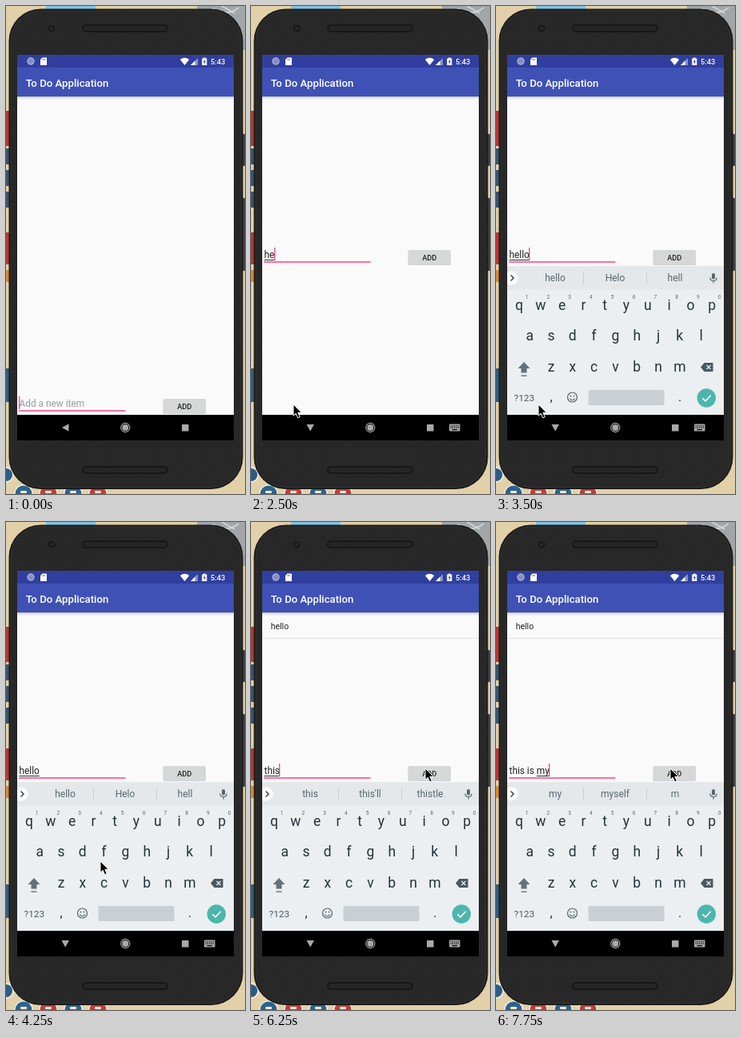
Animation of 299 by 610 pixels, one loop 8000 ms. Source, as an HTML page with a canvas:

```html
<!DOCTYPE html>
<html lang="en">
<head>
<meta charset="utf-8">
<title>To Do Application</title>
<style>
html, body { margin: 0; width: 100%; height: 100%; overflow: hidden; background: #e1d0a8; }
canvas { display: block; }
</style>
</head>
<body>
<canvas id="stage" width="299" height="610"></canvas>
<script>
const ctx = document.getElementById('stage').getContext('2d');
const LOOP = 8000, TICK = 250;
const PINK = '#ff4081', INK = '#263238', NAV = '#a9a9a9';

function rect(x, y, w, h, fill, radius = 0) {
  ctx.fillStyle = fill;
  ctx.beginPath();
  ctx.roundRect(x, y, w, h, radius);
  ctx.fill();
}
function circle(x, y, r, fill) {
  ctx.fillStyle = fill;
  ctx.beginPath();
  ctx.arc(x, y, r, 0, Math.PI * 2);
  ctx.fill();
}
function shape(d, fill, stroke, width = 1, x = 0, y = 0) {
  ctx.save();
  ctx.translate(x, y);
  const path = new Path2D(d);
  if (fill) { ctx.fillStyle = fill; ctx.fill(path); }
  if (stroke) { ctx.strokeStyle = stroke; ctx.lineWidth = width; ctx.stroke(path); }
  ctx.restore();
}
function text(str, x, y, size, fill, align = 'left', weight = 400) {
  ctx.font = `${weight} ${size}px Roboto, sans-serif`;
  ctx.fillStyle = fill;
  ctx.textAlign = align;
  ctx.fillText(str, x, y);
}

// Each entry holds from its time until the next one.
const typed = [[0, ''], [2250, 'h'], [2500, 'he'], [2750, 'hel'], [3000, 'hell'], [3500, 'hello'],
  [5000, ''], [5500, 't'], [5750, 'th'], [6000, 'thi'], [6250, 'this'], [6750, 'this '],
  [7000, 'this i'], [7250, 'this is'], [7500, 'this is m'], [7750, 'this is my']];
const hints = [[2750, 'hel|help|held'], [3250, "hell|he'll|hello"], [3500, 'hello|Helo|hell'],
  [5000, 'thanks|I|we'], [5500, 't|the|to'], [5750, 'th|the|that'], [6000, 'thi|this|think'],
  [6250, "this|this'll|thistle"], [6750, 'is|was|one'], [7000, 'i|is|in'],
  [7250, "is|isn't|island"], [7500, 'm|my|me'], [7750, 'my|myself|m']];
const pointer = [[0, null], [250, [227, 546]], [500, [112, 516]], [750, [53, 498]],
  [4000, [57, 494]], [4250, [118, 424]], [4500, [206, 322]], [4750, [218, 308]]];
const caret = [[0, true], [250, false], [750, true], [1250, false], [1750, true],
  [4000, false], [4500, true]];
const button = [[0, '#d6d7d7'], [4750, '#c9caca'], [5000, '#bfc0c0'], [5250, '#d0d1d1'], [5500, '#d6d7d7']];

const at = (track, time) => track.findLast(([start]) => start <= time)[1];

function drawBackdrop() {
  rect(0, 0, 299, 610, '#e1d0a8');
  rect(50, 0, 62, 4, '#7fc4e4');
  rect(239, 0, 60, 55, '#a3a6a8');
  shape('M258 3Q276 14 291 2M270 0L286 9', null, '#d0d2d3', 2);
  rect(0, 131, 4, 44, '#b8362f');
  for (const y of [178, 205, 232]) rect(0, y, 4, 20, '#38546d');
  rect(0, 283, 4, 40, '#b8362f');
  rect(0, 330, 4, 15, '#d98a2b');
  rect(0, 453, 4, 42, '#315d7c');
  circle(0, 586, 10, '#f0e8dc');
  circle(0, 586, 8, '#2c5c85');
  [22, 53, 84, 115].forEach((x, i) => {
    circle(x, 610, 12, '#f0e8dc');
    circle(x, 610, 10.5, i % 2 ? '#c63b32' : '#2c638d');
    rect(x - 4, 606, 8, 3, '#f0e8dc', 1);
  });
}

function drawPhone() {
  rect(295, 160, 4, 40, '#3d3f42', 1);
  rect(295, 240, 4, 91, '#3d3f42', 1);
  rect(3.5, 3.5, 293, 600.5, '#1b1b1b', 40);
  rect(5.5, 5.5, 289, 596.5, '#343434', 38);
  rect(6.5, 6.5, 287, 594.5, '#282828', 37);
  ctx.save();
  ctx.beginPath();
  ctx.roundRect(7, 7, 286, 593, 36);
  ctx.clip();
  ctx.fillStyle = '#242424';
  for (let y = 7; y < 600; y += 3)
    for (let x = 7 + y % 2; x < 293; x += 3) ctx.fillRect(x, y, 1, 1);
  ctx.restore();
  circle(57, 28, 4.5, '#1a1a1a');
  circle(57, 28, 2, '#2a2a30');
  for (const y of [23, 575]) {
    rect(95, y, 108, 10, '#181818', 5);
    rect(97, y + 2, 104, 6, '#252525', 3);
  }
}

function drawBars(raised) {
  rect(14, 61, 271, 451, '#fafafa');
  for (let i = 0; i < 4; i++) rect(14, 113 + i, 271, 1, `rgba(0,0,0,${0.24 / (i + 1) ** 1.3})`);
  rect(14, 61, 271, 16, '#303f9f');
  rect(14, 77, 271, 36, '#3f51b5');
  circle(31, 69, 4.7, '#a9b1d8');
  circle(31, 69, 3.3, '#838dbf');
  shape('M45.5 64.5H51V74H43V67Z', '#fff');
  shape('M46.3 66v2M48.3 66v2', null, '#303f9f', 0.8);
  shape('M217.8 67Q223.5 62.5 229.2 67L223.5 74Z', '#fff');
  shape('M231 74L240 65V74Z', '#8994ca');
  shape('M231 74L236.5 68.5V74Z', '#fff');
  shape('M247 64.5H249.5V65.5H251.3V74H245.2V65.5H247Z', '#fff');
  shape('M249 66.5L246.7 70H248L247.7 72.8L250 69.3H248.6Z', '#303f9f');
  text('5:43', 256, 72.5, 9.2, '#fff', 'left', 500);
  text('To Do Application', 24.7, 101, 13.2, '#fff', 'left', 500);
}

function drawNavigation(raised) {
  rect(14, 511, 271, 32, '#000');
  shape(raised ? 'M69.5 523H79L74.2 531.5Z' : 'M78.5 522.3V531.8L70 527Z', NAV);
  ctx.strokeStyle = NAV;
  ctx.lineWidth = 1.1;
  ctx.beginPath();
  ctx.arc(149.3, 527, 5.6, 0, Math.PI * 2);
  ctx.stroke();
  circle(149.3, 527, 4, NAV);
  rect(220, 523, 8.5, 8.5, NAV, 0.5);
  if (!raised) return;
  rect(248, 522.5, 13.5, 9, NAV, 1);
  for (let i = 0; i < 5; i++) {
    rect(249.5 + i * 2.3, 524.2, 1.2, 1.2, '#000');
    rect(249.5 + i * 2.3, 526.5, 1.2, 1.2, '#000');
  }
  rect(251.5, 529, 6.5, 1.2, '#000');
}

function drawEntry(time, shift) {
  const value = at(typed, time);
  ctx.save();
  ctx.translate(0, shift);
  text(value || 'Add a new item', 16.5, 501, 11.87, value ? '#212121' : '#9b9b9b');
  const wordStart = value.lastIndexOf(' ') + 1;
  const left = 16.5 + ctx.measureText(value.slice(0, wordStart)).width;
  const right = 16.5 + ctx.measureText(value).width;
  rect(left, 503, right - left, 1, '#333');
  rect(16, 505.2, 133.5, 1.5, PINK);
  if (at(caret, time)) rect(Math.floor(right), 488, 1.3, 16, PINK);

  rect(196.5, 491.8, 53.5, 18.2, 'rgba(0,0,0,.16)', 1.5);
  rect(196.8, 491, 53, 18, at(button, time), 1.5);
  text('ADD', 223.2, 503.8, 9.2, '#212121', 'center', 500);
  ctx.restore();
}

function drawKeyboard(time) {
  rect(14, 325, 271, 187, '#eceff1');
  rect(14, 325, 271, 29.5, '#e4e8ea');
  ctx.save();
  ctx.beginPath();
  ctx.rect(14, 325, 271, 30);
  ctx.clip();
  circle(19, 340, 8.5, '#fff');
  ctx.restore();
  shape('M18.5 336.5L22 340L18.5 343.5', null, '#37474f', 1.5);
  at(hints, time).split('|').forEach((word, i) =>
    text(word, 74 + i * 75, 344.3, 12, '#59666d', 'center'));
  for (const x of [109, 188]) rect(x, 332, 1, 16, '#cbd1d4');
  rect(270, 334, 4, 7.5, '#59666d', 2);
  shape('M267.8 339.5Q268 343.5 272 343.5T276.2 339.5M272 343.5V346.5', null, '#59666d', 1.2);

  const rows = [['qwertyuiop', 29, 379.5], ['asdfghjkl', 42.2, 418], ['zxcvbnm', 69, 457]];
  for (const [keys, x, y] of rows)
    [...keys].forEach((key, i) => text(key, x + i * 26.8, y, 17.5, INK, 'center'));
  for (let i = 0; i < 10; i++) text((i + 1) % 10, 38.5 + i * 26.8, 366, 6.6, '#59666d', 'center');

  shape('M35 445L42.5 453H38.5V458.5H31.5V453H27.5Z', '#657178');
  rect(31.5, 461.5, 7, 1.4, '#657178');
  shape('M256 451.5L260.5 446H271.5V457H260.5Z', '#4b585f');
  shape('M263.5 449L268.5 454M268.5 449L263.5 454', null, '#eceff1', 1.3);

  text('?123', 35.3, 493.5, 11.8, '#4b585f', 'center');
  text(',', 69, 494, 16, INK, 'center');
  text('.', 230, 494, 16, INK, 'center');
  shape('M89.5 489a6 6 0 1 0 12 0a6 6 0 1 0 -12 0M92.3 490.5Q95.5 495 98.7 490.5', null, '#59666d', 1.2);
  circle(93.5, 487.5, 0.9, '#59666d');
  circle(97.5, 487.5, 0.9, '#59666d');
  rect(115.5, 480, 95, 19, '#c9cfd2', 1.5);
  circle(263.3, 490, 11.7, '#4db6ac');
  shape('M258.3 490.2L262 493.8L268.7 486.8', null, '#fff', 1.6);
}

function draw(time) {
  const raised = time >= 2250;
  drawBackdrop();
  drawPhone();
  drawBars();
  if (time >= 5000) {
    text('hello', 24.7, 133.5, 10.5, '#212121');
    rect(14, 145, 271, 1, '#e2e2e2');
  }
  drawEntry(time, raised ? -186 : 0);
  if (time >= 2750) drawKeyboard(time);
  drawNavigation(raised);
  const tip = at(pointer, time);
  if (tip) shape('M0 0V14.3L3.2 11.3L5.6 16.8L8.2 15.7L5.8 10.3H10.3Z', '#000', '#fff', 1, ...tip);
}

let shown = -1;
function tick(now) {
  const time = Math.floor((now % LOOP) / TICK) * TICK;
  if (time !== shown) draw(shown = time);
  requestAnimationFrame(tick);
}
draw(0);
requestAnimationFrame(tick);
</script>
</body>
</html>
```
